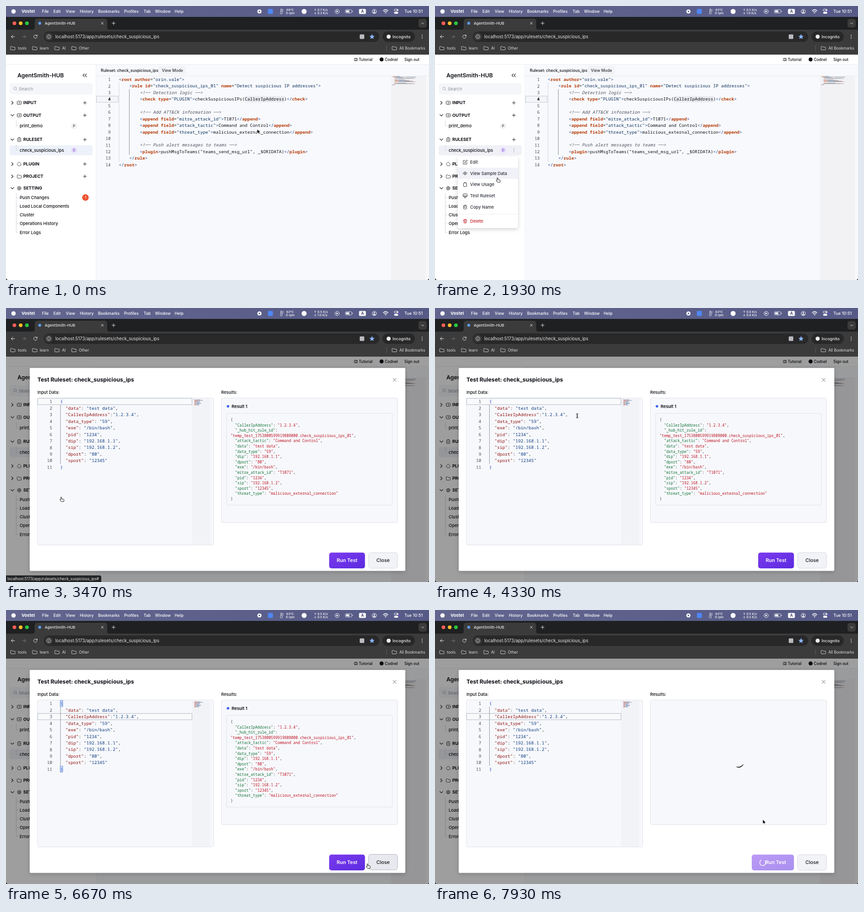
These frames come from a looping animation (928x603 px, 8000 ms). An HTML page:

```html
<!DOCTYPE html>
<html lang="en">
<head>
<meta charset="utf-8">
<title>Ruleset test</title>
<style>
  html, body { margin: 0; height: 100%; overflow: hidden; background: #16171f; }
  svg { display: block; width: 100vw; height: 100vh; }
  text { font-family: Inter, "Open Sans", sans-serif; white-space: pre; }
  .code { font-family: "Noto Sans Mono", "DejaVu Sans Mono", monospace; }
</style>
</head>
<body>
<svg id="stage" viewBox="0 0 928 603"></svg>
<script>
const LOOP = 8000, ROW = 14.45, INK = '#0b0d12';
const $ = id => document.getElementById(id);
const esc = s => s.replace(/&/g, '&amp;').replace(/</g, '&lt;');

// SVG builders; text is placed by its vertical centre
const text = (x, y, s, size = 9.4, fill = INK, weight = 400, attrs = '') =>
  `<text x="${x}" y="${y + size * .36}" font-size="${size}" fill="${fill}" font-weight="${weight}" ${attrs}>${esc(s)}</text>`;
const mid = (x, y, s, size, fill, weight) => text(x, y, s, size, fill, weight, 'text-anchor="middle"');
const rect = (x, y, w, h, fill, r = 0, stroke = 'none', attrs = '') =>
  `<rect x="${x}" y="${y}" width="${w}" height="${h}" rx="${r}" fill="${fill}" stroke="${stroke}" ${attrs}/>`;
const dot = (x, y, r, fill, stroke = 'none', attrs = '') =>
  `<circle cx="${x}" cy="${y}" r="${r}" fill="${fill}" stroke="${stroke}" ${attrs}/>`;
const line = (d, stroke = INK, width = 1, fill = 'none') =>
  `<path d="${d}" fill="${fill}" stroke="${stroke}" stroke-width="${width}" stroke-linecap="round" stroke-linejoin="round"/>`;
const group = (id, body) => `<g id="${id}">${body}</g>`;

// Code: tokens are [text, colour, attributes]
const xmlTokens = s => {
  if (s.trim().startsWith('<!')) return [[s, '#4c525e', 'font-style="italic"']];
  return s.match(/<[^>]*>|[^<]+/g)?.flatMap(part => part[0] !== '<' ? [[part, '#111317']] :
    part.match(/<\/?|>|"[^"]*"|=|[^<>"=]+/g).map(t =>
      /[<>]/.test(t) ? [t, '#123f8c'] : t[0] === '"' ? [t, '#0a305c'] :
      t === '=' ? [t, '#222'] : [t, '#b53c0a', 'font-weight="600"'])) || [];
};
const jsonTokens = (key, value, brace) => s =>
  (s.match(/"[^"]*"(?=\s*:)|"[^"]*"|[{}]|[^"{}]+/g) || []).map((t, i, all) =>
    [t, t[0] === '"' ? (/^\s*:/.test(all[i + 1] || '') ? key : value) : /[{}]/.test(t) ? brace : '#222']);

const codeBlock = (lines, tokens, x, y, size, step) => lines.map((s, i) =>
  `<text class="code" x="${x}" y="${y + i * step + size * .34}" font-size="${size}" font-weight="500">` +
  tokens(s).map(([t, c, a = '']) => `<tspan fill="${c}" ${a}>${esc(t)}</tspan>`).join('') + '</text>').join('');
const lineNumbers = (n, x, y) => Array.from({length: n}, (_, i) =>
  text(x, y + i * ROW, `${i + 1}`, 9.4, '#474c56', 400, 'class="code" text-anchor="end"')).join('');
const minimap = (lines, tokens, x, y, cell) => '<g opacity=".55">' + lines.map((s, i) => {
  let col = 0;
  return tokens(s).map(([t, c]) => {
    const lead = t.length - t.trimStart().length;
    const bar = rect(x + (col + lead) * cell, y + i * 1.45, t.trim().length * cell, .9, c);
    col += t.length;
    return bar;
  }).join('');
}).join('') + '</g>';

const RULES = `<root author="orin.vale">
    <rule id="check_suspicious_ips_01" name="Detect suspicious IP addresses">
        <!── Detection logic ──>
        <check type="PLUGIN">checkSuspiciousIPs(CallerIpAddress)</check>

        <!── Add ATT&CK information ──>
        <append field="mitre_attack_id">T1071</append>
        <append field="attack_tactic">Command and Control</append>
        <append field="threat_type">malicious_external_connection</append>

        <!── Push alert messages to teams ──>
        <plugin>pushMsgToTeams("teams_send_msg_url", _$ORIDATA)</plugin>
    </rule>
</root>`.split('\n');
const INPUT = `{
  "data": "test data",
  "CallerIpAddress":"1.2.3.4",
  "data_type": "59",
  "exe": "/bin/bash",
  "pid": "1234",
  "dip": "192.168.1.1",
  "sip": "192.168.1.2",
  "dport": "80",
  "sport": "12345"
}`.split('\n');
const RESULT = `{
  "CallerIpAddress": "1.2.3.4",
  "_hub_hit_rule_id":
"temp_test_1753800599919808000.check_suspicious_ips_01",
  "attack_tactic": "Command and Control",
  "data": "test data",
  "data_type": "59",
  "dip": "192.168.1.1",
  "dport": "80",
  "exe": "/bin/bash",
  "mitre_attack_id": "T1071",
  "pid": "1234",
  "sip": "192.168.1.2",
  "sport": "12345",
  "threat_type": "malicious_external_connection"
}`.split('\n');
const inputTokens = jsonTokens('#8f1111', '#0b3a80', '#1535c4');
const resultTokens = jsonTokens('#0d7136', '#bb1020', '#444');

function menuBar() {
  const items = [[79, 'File'], [104, 'Edit'], [131, 'View'], [162, 'History'], [202, 'Bookmarks'],
    [259, 'Profiles'], [302, 'Tab'], [327, 'Window'], [370, 'Help']];
  const w = '#fff';
  return rect(0, 0, 928, 24, 'url(#bar)') + dot(16.5, 12, 4.8, w) + text(34, 11.5, 'Vostel', 9.5, w, 700) +
    items.map(([x, s]) => text(x, 11.5, s, 8.8, w, 500)).join('') +
    dot(556, 12, 4.6, w) + dot(556, 12, 1.7, '#565a86') +
    rect(574.5, 6.5, 11, 11, '#4f86f5', 2) +
    line('M602.8 13V7.5a1.2 1.2 0 0 1 2.4 0V13a2.4 2.4 0 1 1-2.4 0M607 8h1.5M607 11h1.5', w, .9) +
    group('temp', '') + text(614, 16, '0 rpm', 6.8, w, 500) +
    dot(654, 12, 5.5, w) + group('speed', '') +
    dot(726.5, 12, 4.6, 'none', w) + line('M725 9.8v4.4l3.6-2.2z', w, .3, w) +
    rect(744.5, 8, 14, 7.5, 'none', 2, '#d5d6e4') + rect(746, 9.5, 6, 4.5, w, 1) +
    line('M753 9l-2 3h3l-2 3', w, .9) + line('M760.3 10.8v2', w, 1) +
    rect(774.5, 6.5, 15, 11, w, 2) + mid(782, 12, 'A', 8.5, '#33375b', 600) +
    dot(808, 12, 4.7, 'none', w) + dot(808, 10.6, 1.6, w) + line('M805 14.8q3-3 6 0z', w, .8, w) +
    line('M827.6 10.2q5.2-4.6 10.4 0M829.7 12.6q3.1-2.6 6.2 0', w, 1.5) + dot(832.8, 15, 1.2, w) +
    rect(851.5, 7, 9, 4, 'none', 2, w) + dot(858.4, 9, 1.3, w) + rect(851.5, 13, 9, 4, w, 2) +
    group('privacy', dot(863.5, 12, 1.8, '#6f4bd8')) + text(874, 11.5, 'Tue 10:51', 9.1, w, 500);
}

function browser() {
  const pale = '#d8d9db';
  const folder = x => line(`M${x} 90q0-1 1-1h2.5l1.3 1.5h4.2q1 0 1 1v4q0 1-1 1h-8q-1 0-1-1z`, pale, .9);
  return `<path d="M0 107V30q0-6 6-6h916q6 0 6 6v77z" fill="#1f2021"/>` +
    ['#ff5f57', '#febc2e', '#28c840'].map((c, i) => dot(18.5 + i * 13.7, 38, 4.1, c)).join('') +
    `<path d="M58 52q5 0 5-5V34q0-6 6-6h147q6 0 6 6v13q0 5 5 5z" fill="#3b3b3c"/>` + rect(0, 52, 928, 55, '#3b3b3c') +
    dot(74, 38, 3.2, '#5f9ae8') + text(85, 38, 'AgentSmith-HUB', 8.2, '#e8e8e8', 500) +
    line('M209 35.7l4.6 4.6m0-4.6l-4.6 4.6M232.5 38h7M236 34.5v7', '#e3e3e3') +
    rect(905, 28.5, 18, 19, '#3b3b3c', 5) + line('M911.5 37l2.7 2.6 2.7-2.6', '#e3e3e3') +
    line('M19 67.5h-7.5m3.5-3.5l-3.5 3.5 3.5 3.5', '#e3e3e3') + line('M36 67.5h7.5m-3.5-3.5l3.5 3.5-3.5 3.5', '#777') +
    line('M68 65.7a3.8 3.8 0 1 0 .2 3M68.4 63.5v2.7h-2.7', '#e3e3e3') +
    rect(83, 56, 736, 23, '#282829', 11.5) + dot(94, 67.5, 8.5, '#3b3b3c') +
    dot(94, 67.5, 4.2, 'none', '#e3e3e3') + line('M94 67v2.5M94 65.2v.1', '#e3e3e3') +
    text(108, 67.5, 'localhost:5173/app/rulesets/check_suspicious_ips', 9.7, '#e6e6e6') +
    rect(776, 62.5, 10, 10, '#b9bbbf', 1.5) +
    `<path d="M803 61.8l1.7 3.7 4 .4-3 2.7.9 4-3.6-2.1-3.6 2.1.9-4-3-2.7 4-.4z" fill="#8ab4f8"/>` +
    rect(826, 56, 71, 23, '#282829', 11.5) + dot(839.5, 67.5, 4.5, '#eee') + text(848, 67.5, 'Incognito', 8.9, '#eee', 500) +
    [64, 67.5, 71].map(y => dot(913, y, .9, '#e3e3e3')).join('') +
    [[10, 'tools'], [58, 'learn'], [107, 'AI'], [144, 'Other'], [847, 'All Bookmarks']]
      .map(([x, s]) => folder(x) + text(x + 16, 92.7, s, 8.4, '#dedede')).join('') +
    line('M835 87.5v11', '#606164');
}

const chevron = (x, y, open) => line(open ? `M${x - 3.3} ${y - 1.7}l3.3 3.4 3.3-3.4` : `M${x - 1.7} ${y - 3.3}l3.4 3.3-3.4 3.3`, '#222', 1.2);
const screenIcon = (x, y) => rect(x - 4.5, y - 3.5, 9, 7, 'none', 1.2, '#333') + line(`M${x - 2} ${y}h4m-1.5-1.5l1.5 1.5-1.5 1.5`, '#333', .8);
const clipIcon = (x, y, c = '#333') => rect(x - 3.4, y - 3.7, 6.8, 8, 'none', 1, c) + rect(x - 1.5, y - 4.7, 3, 1.8, c, .5);

function sidebar() {
  const icons = {
    INPUT: screenIcon(29, 213), OUTPUT: screenIcon(29, 240.5),
    RULESET: clipIcon(29, 294) + line('M27.5 293.5h3m-3 2h3', '#333', .8),
    PLUGIN: line('M24.5 348l3-3q1-3 2.6-.6l3 3q.5 1-.5 1.5t.5 1.2l-2.4 2q-1-2-2-.4t-1.6-.3z', '#333', .9),
    PROJECT: line('M24.5 372.5q0-1 1-1h2l1.3 1.4h3.7q1 0 1 1v4q0 1-1 1h-7q-1 0-1-1z', '#333', .9),
    SETTING: dot(29, 401, 3.6, 'none', '#333', 'stroke-width="1.6" stroke-dasharray="2 .8"') + dot(29, 401, 1.4, 'none', '#333')
  };
  const sections = [['INPUT', 213], ['OUTPUT', 240.5, 1], ['RULESET', 294, 1], ['PLUGIN', 347.7], ['PROJECT', 375], ['SETTING', 401, 1]];
  const pages = [['Push Changes', 421.5], ['Load Local Components', 440.7], ['Cluster', 460], ['Operations History', 479], ['Error Logs', 498.3]];
  const gray = '#d3d6dc';
  return rect(0, 129, 197, 474, '#fff') + line('M197.5 129v474', '#eceef2') +
    text(25, 152.5, 'AgentSmith-HUB', 12.3, INK, 600) + line('M172 149.2l-3.2 3.3 3.2 3.3m4.6-6.6l-3.2 3.3 3.2 3.3', '#222', 1.1) +
    rect(8, 170, 182, 24.5, '#f5f6f9', 5) + dot(20, 181.3, 3, 'none', '#a5abb6') + line('M22.3 183.6l2 2', '#a5abb6') +
    text(28, 182.3, 'Search', 9.5, '#8b919d') +
    sections.map(([s, y, open]) => chevron(14, y, open) + icons[s] + text(38, y, s, 9.4, INK, 700) +
      (s === 'SETTING' ? '' : line(`M169.7 ${y}h6.6M173 ${y - 3.3}v6.6`, '#222'))).join('') +
    rect(8, 306.5, 182, 22, '#edf2fa', 4, 'none', 'id="activeRow"') +
    line('M22.5 252v12h4.5M22.5 306v11.5h4.5M22.5 412v86.3', gray) +
    text(30, 264, 'print_demo', 9.4, INK, 500) + dot(149.5, 264, 7, '#f1f2f4') + mid(149.5, 264, 'P', 7.6, '#444', 500) +
    text(30, 317.5, 'check_suspicious_ips', 9.4, INK, 500) + dot(149.5, 317.5, 7, '#eae2fb') + mid(149.5, 317.5, 'D', 7.6, '#6d36c9', 500) +
    group('dots', [314, 317.5, 321].map(y => dot(173, y, .8, '#777')).join('')) +
    pages.map(([s, y]) => line(`M22.5 ${y}h4`, gray) + text(30, y, s, 9.4, INK, 500)).join('') +
    dot(174.3, 421.5, 7.2, '#ef5230') + mid(174.3, 421.5, '1', 8, '#fff', 500);
}

function editor() {
  return rect(198, 129, 730, 474, '#f8f9fc') + rect(334, 132, 60, 19, '#f2f3f7', 3) +
    text(208, 141.5, 'Ruleset: check_suspicious_ips', 8.7, INK, 500) + text(342, 141.5, 'View Mode', 8.7, '#333', 500) +
    line('M198 154h730', '#e6e8ed') + rect(845, 154.5, 83, 449, '#f2f2f5') + rect(921, 154.5, 7, 449, '#f8f8fa') +
    rect(198.5, 198.3, 47.5, 13.7, '#f4f5f9', 0, '#c4c8d1') + rect(524, 198.5, 87, 13.5, '#e8eaf0') +
    line('M248 169.5V342', '#d3d5db') + line('M270.6 183.5V327', '#858991') +
    lineNumbers(14, 229.7, 161.7) + text(229.7, 205, '4', 9.4, '#111', 600, 'class="code" text-anchor="end"') +
    group('folds', line('M236.5 160.5l3 3 3-3M236.5 175l3 3 3-3', '#c3c7cf')) +
    codeBlock(RULES, xmlTokens, 247.5, 161.7, 9.6, ROW) + minimap(RULES, xmlTokens, 847, 154.5, .69);
}

function page() {
  return rect(0, 107, 928, 22, '#fff') + line('M0 128.7h928', '#e6e8ed') +
    line('M767.5 115.2h-3.2v5.3h3.2zm0 0h3.2v5.3h-3.2', INK, .9) + text(774, 117.7, 'Tutorial', 8.4, INK, 500) +
    dot(824, 117.7, 4.4, INK) + text(831, 117.7, 'Codnel', 8.4, INK, 500) + text(874, 117.7, 'Sign out', 8.4, INK, 500) +
    editor() + sidebar();
}

const MENU = [['Edit', 343.5], ['View Sample Data', 368.2], ['View Usage', 393], ['Test Ruleset', 417.7], ['Copy Name', 442.4], ['Delete', 473.3]];
function contextMenu() {
  const c = '#333', red = '#c4222a';
  const icons = [
    line('M66 340h-4v8h8v-4M65 345l.5-2 4.5-4 1.3 1.3-4.5 4.2z', c, .9),
    line('M61.5 368.2q4.5-6.5 9 0-4.5 6.5-9 0z', c, .9) + dot(66, 368.2, 1.4, 'none', c),
    clipIcon(66, 393), rect(61.5, 413.5, 9, 6, 'none', 1, c) + line('M61.5 417.7h9M64 422h4M66 420v2', c, .9),
    clipIcon(66, 442.4) + line('M68 442.5h-4m1.5-1.5l-1.5 1.5 1.5 1.5', c, .8),
    line('M62 471h8M64.5 471v-1.5h3v1.5M63 471l.4 6.5h5.2l.4-6.5M65 473v3M67 473v3', red, .9)];
  return rect(50, 331.5, 132, 157, '#fff', 4, 'none', 'filter="url(#shadow)"') +
    rect(50, 0, 132, 24.7, '#f1f2f8', 0, 'none', 'id="menuHover"') + line('M50 458h132', '#eceef2') +
    MENU.map(([s, y], i) => icons[i] + text(77, y, s, 9.4, i === 5 ? red : '#2c3038', 500)).join('');
}

function modal() {
  const panel = '#f7f8fb', edge = '#dfe2e9';
  return rect(0, 107, 928, 496, '#000', 0, 'none', 'opacity=".38"') +
    rect(52, 132, 824, 446.5, '#fff', 2, 'none', 'filter="url(#shadow)"') +
    text(69, 158, 'Test Ruleset: check_suspicious_ips', 12.25, INK, 700) + line('M849 154.5l7 7m0-7l-7 7', '#666') +
    text(69, 185.5, 'Input Data:', 9.3, INK, 500) + text(472, 185.5, 'Results:', 9.3, INK, 500) +
    rect(69, 198, 386.5, 323.5, panel, 4, edge) + rect(408, 198.5, 40, 322.5, '#f2f3f6') +
    rect(69.5, 198.8, 338.5, 13.8, '#f9fafc', 0, '#bcc1cc', 'id="inputLine" stroke-width="1.2"') +
    line('M119.5 213v129.5', '#858a94', .9) +
    group('brackets', [205.7, 350.2].map(y => rect(119, y - 6.5, 5.5, 13, '#dbe6fa', 0, '#5a84d0')).join('')) +
    lineNumbers(11, 101.3, 206) + codeBlock(INPUT, inputTokens, 119, 206, 9.6, ROW) + minimap(INPUT, inputTokens, 412, 200, .66) +
    rect(472.5, 198, 386.5, 274.5, panel, 4, edge) +
    group('result', dot(487, 216.3, 2.8, '#3f66ee') + text(495, 216.3, 'Result 1', 9.3, INK, 600) +
      rect(484, 231.8, 363.5, 202, panel, 3, edge) + codeBlock(RESULT, resultTokens, 492.7, 246.3, 8.2, 11.6)) +
    group('ready', rect(709, 538.3, 78.5, 34.7, 'url(#run)', 5) + mid(748.2, 555.5, 'Run Test', 10.8, '#fff', 600)) +
    group('loading', rect(695, 538.3, 92.5, 34.7, 'url(#run)', 5, 'none', 'opacity=".52"') + text(725, 555.5, 'Run Test', 10.8, '#fff', 600) +
      '<g transform="translate(719 556)"><path id="miniSpin" d="M-3-5.8A6.5 6.5 0 1 0 4.8-4.4" fill="none" stroke="#fff" stroke-width="1.4"/></g>' +
      '<g transform="translate(666.3 335.3)"><path id="spin" d="M-7.8 7.8A11 11 0 0 0 7.8 7.8Q0 12.6-7.8 7.8z" fill="#111" stroke="#111" stroke-width=".9"/></g>') +
    group('close', rect(795.5, 538.5, 63.5, 34, '#f2f3f7', 5, '#d5d8e2', 'id="closeBox"') + mid(827.2, 555.5, 'Close', 10.8, '#16181f', 500));
}

const cursors =
  group('arrow', line('M0 0V9.6L2.2 7.6 3.7 11 5.2 10.3 3.8 7.2H6.9Z', '#fff', .8, '#000')) +
  group('hand', line('M-1 1a1 1 0 0 1 2 0V4L5 4.8Q6.5 5.2 6.3 7L5.6 10H.2L-2.8 6.4Q-2.6 5-1 6Z', '#000', .9, '#fff')) +
  group('beam', line('M-2-4.5q2 0 2 1.2V4q0 1-2 1M2-4.5q-2 0-2 1.2V4q0 1 2 1', '#111', 1)) +
  group('ring', dot(0, 0, 21, 'none', '#111', 'stroke-width="1.6"'));

$('stage').innerHTML = `<defs>
  <linearGradient id="bar"><stop stop-color="#62668f"/><stop offset="1" stop-color="#565a86"/></linearGradient>
  <linearGradient id="run" x2="1" y2="1"><stop stop-color="#7c3aed"/><stop offset="1" stop-color="#5b2be0"/></linearGradient>
  <filter id="shadow" x="-20%" y="-20%" width="140%" height="140%"><feDropShadow dx="0" dy="3" stdDeviation="4" flood-opacity=".18"/></filter>
  <clipPath id="window"><path d="M0 107H928V597q0 6-6 6H6q-6 0-6-6z"/></clipPath></defs>` +
  menuBar() + browser() +
  `<g clip-path="url(#window)">${page()}${group('menu', contextMenu())}${group('modal', modal())}` +
  group('status', `<path d="M0 588.5h205q4 0 4 4V603H0z" fill="#222324"/>` +
    text(3, 596, 'localhost:5173/app/rulesets/check_suspicious_ips#', 8.3, '#eee')) +
  `</g>${group('cursor', cursors)}`;

// Pointer stops: time, x, y, shape used on the way there
const PATH = [[0, 551, 271, 'arrow'], [800, 190, 321, 'arrow'], [1050, 173, 317, 'arrow'], [1450, 173, 317, 'hand'],
  [1930, 137, 378, 'hand'], [2750, 121, 416, 'hand'], [3500, 121, 416, 'hand'], [4100, 300, 244, 'arrow'],
  [4250, 312, 237, 'beam'], [5400, 312, 237, 'beam'], [6450, 793, 558.5, 'arrow'], [6900, 793, 558.5, 'hand'],
  [7400, 745, 557, 'hand'], [7690, 745, 557, 'hand'], [7930, 719, 461, 'arrow'], [8000, 718, 458, 'arrow']];
const CLICKS = [1200, 3200, 4600, 7520];
const SPEEDS = [[0, '0.7', '0.3'], [1130, '0.5', '1.0'], [3700, '0.0', '0.0'], [5500, '0.5', '0.5']];

function pointer(t) {
  const i = PATH.findIndex(p => p[0] > t), a = PATH[i - 1], b = PATH[i];
  const u = (t - a[0]) / (b[0] - a[0]), e = u * u * (3 - 2 * u);
  return {x: a[1] + (b[1] - a[1]) * e, y: a[2] + (b[2] - a[2]) * e, shape: b[3]};
}
const show = (id, on) => $(id).setAttribute('visibility', on ? 'inherit' : 'hidden');
const set = (id, name, value) => $(id).setAttribute(name, value);

function draw(t) {
  const p = pointer(t), opened = t >= 3400, running = t >= 7670;
  const menuOpen = t >= 1330 && !opened, typing = t >= 4640;
  set('cursor', 'transform', `translate(${p.x} ${p.y})`);
  ['arrow', 'hand', 'beam'].forEach(s => show(s, s === p.shape));
  show('ring', CLICKS.some(c => t >= c && t < c + 135));

  const hovered = t > 820;
  set('activeRow', 'fill', hovered ? '#f0f1f7' : '#edf2fa');
  show('dots', hovered);
  show('folds', t > 560 && t < 940);
  show('menu', menuOpen);
  const item = MENU.find(([, y]) => Math.abs(p.y - y) <= 12.4);
  show('menuHover', menuOpen && item);
  if (item) set('menuHover', 'y', item[1] - 12.35);
  show('status', t > 2300 && t < 3600);

  show('modal', opened);
  set('inputLine', 'y', 198.8 + (typing ? 2 * ROW : 0));
  show('brackets', opened && typing && t < 7540);
  show('result', opened && !running);
  show('ready', opened && !running);
  show('loading', running);
  const overClose = p.x > 790 && p.y > 538;
  set('close', 'transform', `translate(0 ${overClose ? -.7 : 0})`);
  set('closeBox', 'fill', overClose ? '#e7e9ee' : '#f2f3f7');
  set('closeBox', 'stroke', overClose ? '#b0b5c2' : '#d5d8e2');
  const turn = (t - 7930) * .36;
  set('spin', 'transform', `rotate(${turn - 20})`);
  set('miniSpin', 'transform', `rotate(${turn})`);

  show('privacy', t > 400);
  $('temp').innerHTML = text(615, 8.8, t < 400 ? '69°C' : '63°C', 6.8, '#fff', 500);
  const [, up, down] = SPEEDS.findLast(s => t >= s[0]);
  $('speed').innerHTML = text(675.5, 8.5, `↑ ${up} K/s`, 6.8, '#fff', 500) + text(675.5, 15.8, `↓ ${down} K/s`, 6.8, '#fff', 500);
}

function tick() {
  draw(performance.now() % LOOP);
  requestAnimationFrame(tick);
}
tick();
</script>
</body>
</html>
```
